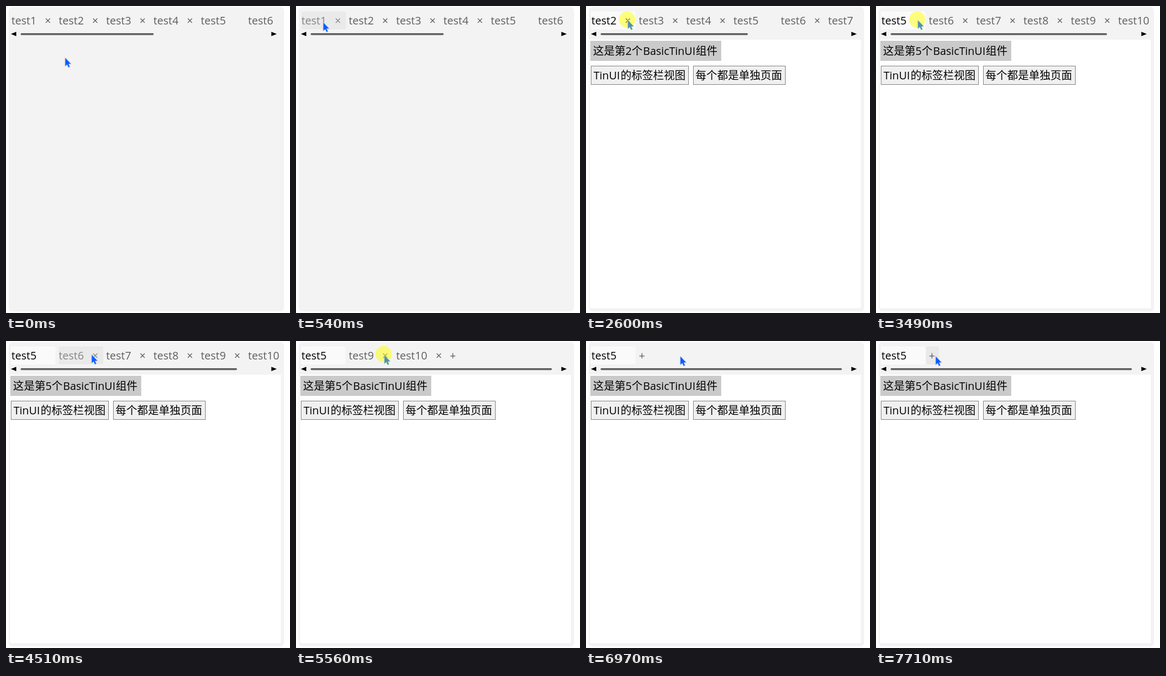
An HTML page with a canvas that plays this animation: 525x565 px, repeating every 8000 ms.

```html
<!DOCTYPE html>
<html lang="zh-CN">
<head>
<meta charset="utf-8">
<title>Tab view</title>
<style>
  html, body { margin: 0; width: 100%; height: 100%; overflow: hidden; background: #fff; }
  canvas { display: block; }
</style>
</head>
<body>
<canvas id="stage" width="525" height="565"></canvas>
<script>
const ctx = document.getElementById('stage').getContext('2d');
const LOOP = 8000;
const FONT = '20px "Open Sans", "Noto Sans CJK SC", "Noto Sans CJK", "Noto Sans", sans-serif';
const GRAY = '#5f5f5f', PALE = '#868686', INK = '#000';

// start, end, steps, target x, target y
const moves = [
  [70, 670, 10, 43, 22],
  [1670, 1880, 4, 67, 25],
  [2140, 2140, 1, 77, 26],
  [4150, 4510, 6, 158, 25],
  [4840, 4900, 2, 163, 26],
  [6160, 6310, 3, 174, 28],
  [7300, 7710, 7, 110, 28]
];

// press, release, centre x, centre y
const presses = [
  [1200, 1490, 43, 21],
  [2600, 2810, 76, 25],
  [3010, 4150, 76, 25],
  [5230, 5910, 162, 24],
  [6700, 6970, 173, 28]
];

const SELECT_AT = 1270;
const closings = { 1: 2600, 2: 3010, 3: 3290, 4: 3490, 6: 5230, 7: 5360, 8: 5560, 9: 5690, 10: 6770 };

function cursorAt(t) {
  let x = 109, y = 95;
  for (const [start, end, steps, tx, ty] of moves) {
    if (t < start) break;
    const gap = steps > 1 ? (end - start) / (steps - 1) : 1;
    const k = Math.min(steps, Math.floor((t - start) / gap + 1e-6) + 1);
    const u = k / steps, e = u * u * (3 - 2 * u);
    x += (tx - x) * e;
    y += (ty - y) * e;
  }
  return { x: Math.round(x), y: Math.round(y) };
}

function box(x, y, w, h, r, fill) {
  ctx.fillStyle = fill;
  ctx.beginPath();
  ctx.roundRect(x, y, w, h, r);
  ctx.fill();
}

function poly(points, fill) {
  ctx.fillStyle = fill;
  ctx.beginPath();
  points.forEach(([x, y]) => ctx.lineTo(x, y));
  ctx.closePath();
  ctx.fill();
}

function label(str, x, y, color, align = 'left') {
  ctx.fillStyle = color;
  ctx.textAlign = align;
  ctx.fillText(str, x, y);
}

function drawTabs(t, pos) {
  const open = [];
  for (let n = 1; n <= 10; n++) if (!(t >= closings[n])) open.push(n);

  // A tab sliding under a resting pointer is not highlighted until it is released
  const hoverable = pos.y < 43 && (t < 5230 || t >= 5910);
  const over = (x, w) => hoverable && pos.x >= x && pos.x < x + w;

  ctx.save();
  ctx.beginPath();
  ctx.rect(7, 6, 501, 40);
  ctx.clip();
  let x = 10;
  open.forEach((n, i) => {
    const width = n === 10 ? 94 : 82.5;
    const selected = i === 0 && t >= SELECT_AT;
    const hover = !selected && over(x, width);
    const color = selected ? INK : hover ? PALE : GRAY;
    if (selected) box(x - 1, 10, width, 33, 3, '#fafafa');
    else if (hover) box(x, 10, width, 33, 3, '#eaeaea');
    label('test' + n, x, 34, color);
    if (n !== 5) label('×', x + width - 15, 34, color, 'center');
    x += width + 5;
  });
  if (over(x - 5, 24)) box(x - 5, 10, 24, 33, 3, '#e9e9e9');
  label('+', x + 6, 34, GRAY, 'center');
  ctx.restore();
  return open;
}

function drawScrollbar(count, pos) {
  const ratio = 1 / Math.max(1, 1.813 - 0.1745 * (10 - count));
  const width = 446 * ratio;
  const hover = pos.y >= 46 && pos.y < 57 && pos.x > 27 && pos.x < 27 + width;
  const grow = hover ? 2 : 0;
  box(27 - grow, 50 - grow, width + 2 * grow, 3.6 + 2 * grow, 4, '#5f5f5f');
  poly([[9, 51.5], [19, 47.5], [19, 55.5]], '#000');
  poly([[500.5, 51.5], [490.5, 47.5], [490.5, 55.5]], '#000');
}

function button(x, w, ...parts) {
  ctx.fillStyle = '#f0f0f0';
  ctx.fillRect(x, 110, w, 35);
  ctx.strokeStyle = '#808080';
  ctx.lineWidth = 1;
  ctx.strokeRect(x + 0.5, 110.5, w - 1, 34);
  for (const [str, dx] of parts) label(str, x + dx, 135, INK);
}

function drawPage(n) {
  ctx.fillStyle = '#fff';
  ctx.fillRect(7, 62, 501, 494);
  ctx.fillStyle = '#cacaca';
  ctx.fillRect(8, 64, 242, 37);
  label('这是第' + n + '个', 13, 90, INK);
  label('BasicTinUI', 105.5, 90, INK);
  label('组件', 203, 90, INK);
  button(9, 181, ['TinUI', 5], ['的标签栏视图', 55]);
  button(198, 171, ['每个都是单独页面', 4.5]);
}

function drawPointer(t, pos) {
  const press = presses.find(([down, up]) => t >= down && t < up);
  if (press) {
    ctx.fillStyle = 'rgba(255, 255, 0, 0.5)';
    ctx.beginPath();
    ctx.arc(press[2], press[3], 15, 0, Math.PI * 2);
    ctx.fill();
  }
  ctx.save();
  ctx.translate(pos.x, pos.y);
  const arrow = new Path2D('M.5 .5V15.5L4 12.4L6.6 17.8L8.8 16.8L6.4 11.4H11Z');
  ctx.lineJoin = 'round';
  ctx.globalAlpha = press ? 0.75 : 1;
  ctx.strokeStyle = press ? '#c8d8a0' : '#b4b4b4';
  ctx.lineWidth = 1.6;
  ctx.stroke(arrow);
  ctx.strokeStyle = press ? '#e4ecc0' : '#fff';
  ctx.lineWidth = 0.9;
  ctx.stroke(arrow);
  ctx.fillStyle = press ? '#1470b4' : '#0a5cff';
  ctx.fill(arrow);
  ctx.restore();
}

function draw(t) {
  const pos = cursorAt(t);
  ctx.font = FONT;
  ctx.textBaseline = 'alphabetic';
  ctx.fillStyle = '#fff';
  ctx.fillRect(0, 0, 525, 565);
  box(5, 2, 509, 560, 7, '#f3f3f3');
  const open = drawTabs(t, pos);
  drawScrollbar(open.length, pos);
  if (t >= SELECT_AT) drawPage(open[0]);
  drawPointer(t, pos);
}

const begin = performance.now();
function tick() {
  draw((performance.now() - begin) % LOOP);
  requestAnimationFrame(tick);
}
tick();
</script>
</body>
</html>
```
